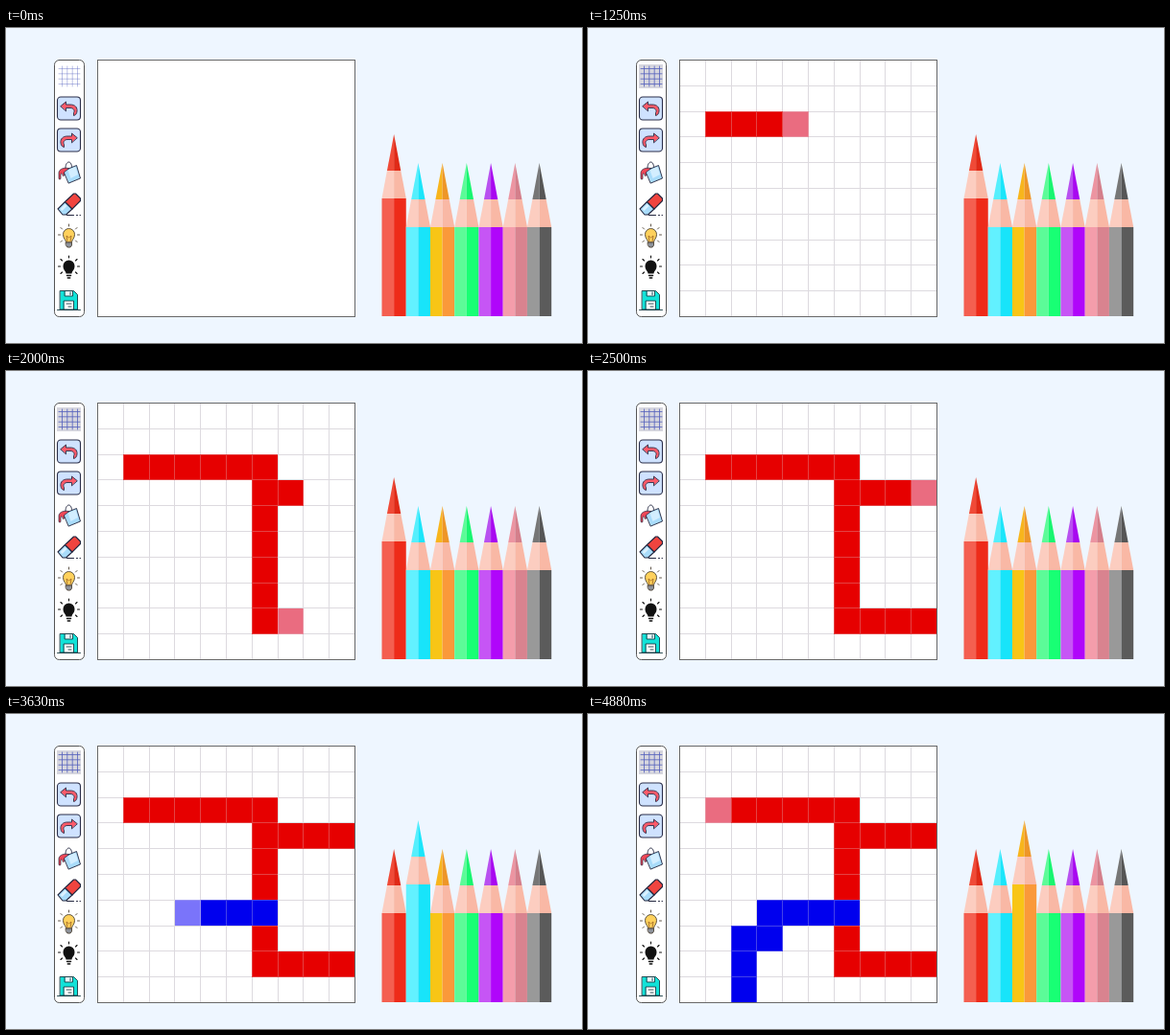
Recreate the animation shown at these times as an HTML page. Size 600x329 px, loop 5010 ms.

```html
<!DOCTYPE html>
<html lang="en">
<head>
<meta charset="utf-8">
<title>Pixel drawing board</title>
<style>
html, body { margin: 0; width: 100%; height: 100%; overflow: hidden; background: #eef6ff; }
svg { display: block; width: 100vw; height: 100vh; }
</style>
</head>
<body>
<svg viewBox="0 0 600 329" stroke-linejoin="round" stroke-linecap="round">
  <defs>
    <g id="undo" stroke="#2b2f4a">
      <rect x="1" y="1" width="24" height="24" rx="3.500" fill="#cfe2ff" stroke-width="1.100"/>
      <path d="M4.500 10.500 10 6V9H14.500C19.500 9 22 12 21.500 16 21.200 18.500 20 20 18 20.500V17.500C19.500 15.500 18 12.500 14.500 12.500H10V15.500Z" fill="#ff5a69" stroke-width=".9"/>
    </g>
    <path id="rays" d="M13 1V3M4.500 4.500 6 6M21.500 4.500 20 6M2 12H4M22 12H24M4.500 19.500 6 18M21.500 19.500 20 18"/>
    <path id="glass" d="M10 19.500C10 17 7 16 7 11.500A6 6 0 0 1 19 11.500C19 16 16 17 16 19.500Z"/>
  </defs>

  <rect x="50.5" y="33.5" width="31" height="268" rx="5" fill="#fff" stroke="#555"/>

  <rect id="hover" x="53" y="38" width="25" height="25" fill="#d6d6de"/>
  <path id="gridIcon" d="M58.500 40V61M63.800 40V61M69.200 40V61M74.500 40V61M55 42.500H77M55 47.800H77M55 53.200H77M55 58.500H77" fill="none" stroke="#5360bd" stroke-width=".8"/>

  <use href="#undo" x="52.500" y="71"/>
  <use href="#undo" transform="translate(78.500 104) scale(-1 1)"/>

  <g transform="translate(52.5 138)" stroke="#22263f" stroke-width=".9">
    <path d="M9.500 10C9 5 11 2 13 2 15 2 16 5 16.500 9" fill="none"/>
    <path d="M7.500 11 21 5.500 25 19 13 24Z" fill="#a9dcfb"/>
    <path d="M12 10.500 20 7 22.500 15 15 19Z" fill="#d3eeff" stroke="none"/>
    <path d="M13 8.500C8 7.500 3 9 2.500 13V19C2.500 20.500 4.500 20.500 4.500 19V14.500C5.500 13.500 6.500 14 6.500 15.500 6.500 17 8 17 8 15.500V13Z" fill="#ef4656" stroke-width=".7"/>
  </g>

  <g transform="translate(52.5 171)" stroke="#22263f" stroke-width="1.100">
    <path d="M1.500 18 9 10.500 16.500 18 10 24H6.500Z" fill="#a9dcfb"/>
    <path d="M9 10.500 18 2H20L25 7V9.500L16.500 18Z" fill="#f0443f"/>
    <path d="M4 18 9 13 11 15 6 20Z" fill="#dcf2ff" stroke="none"/>
    <path d="M11 24.500H18M21 24.500H22M24.500 24.500H25" fill="none"/>
  </g>

  <g transform="translate(52.5 204)" stroke="#4c4234" stroke-width=".9" fill="none">
    <use href="#rays"/>
    <use href="#glass" fill="#ffd15c"/>
    <path d="M11.500 19 10.500 13 13 15 15.500 13 14.500 19" stroke="#a56e26"/>
    <path d="M10 20H16V23L14.500 25H11.500L10 23Z" fill="#8d929b"/>
  </g>

  <g transform="translate(52.5 237)" stroke="#111" stroke-width="1.100">
    <use href="#rays"/>
    <use href="#glass" fill="#111" stroke="none"/>
    <path d="M11 21.500H15M11.800 24H14.200" stroke-width="1.500"/>
  </g>

  <g transform="translate(52.5 271)" stroke="#173c45" stroke-width=".9">
    <path d="M4 3.500H18L22 7.500V23H4Z" fill="#12e2d8"/>
    <path d="M9 3.500H17V9H9Z" fill="#e8fbff"/>
    <path d="M8 14H18V23H8Z" fill="#fff"/>
    <path d="M14.500 5V7.500M10.500 17H15.500M12.500 20H15.500M1 23.500H25" fill="none"/>
  </g>

  <rect x="95.500" y="33.500" width="268.500" height="268" fill="#fff"/>
  <path id="lines" fill="none" stroke="#dcd9df" shape-rendering="crispEdges"/>
  <g id="cells" shape-rendering="crispEdges"></g>
  <use href="#lines" opacity=".3"/>
  <rect x="95.500" y="33.500" width="268" height="268" fill="none" stroke="#686868" stroke-linejoin="miter"/>
  <g id="pencils"></g>
</svg>
<script>
const LOOP = 5010, SIZE = 26.8, LEFT = 95.5, TOP = 33.5;
const RED = ['#e60000', '#ea6c80'], BLUE = ['#0000ee', '#7a74fa'];
const $ = id => document.getElementById(id);

function add(parent, tag, attrs) {
  const el = document.createElementNS('http://www.w3.org/2000/svg', tag);
  for (const k in attrs) el.setAttribute(k, attrs[k]);
  return parent.appendChild(el);
}

// Painted cells in order: column, row, time of the click
const red = [
  [1, 2, 1080], [2, 2, 1130], [3, 2, 1245], [4, 2, 1380], [5, 2, 1440], [6, 2, 1500],
  [6, 3, 1570], [7, 3, 1630], [6, 4, 1690], [6, 5, 1750], [6, 6, 1810], [6, 7, 1880],
  [6, 8, 1960], [7, 8, 2125], [8, 8, 2250], [9, 8, 2380], [8, 3, 2500], [9, 3, 2630]
];
const blue = [
  [6, 6, 3380], [5, 6, 3500], [4, 6, 3620], [3, 6, 3750], [3, 7, 3810],
  [2, 7, 3880], [2, 8, 3940], [2, 9, 4000]
];
const strokes = [
  ...red.map(s => [...s, RED]), ...blue.map(s => [...s, BLUE]), [1, 2, LOOP, RED]
].map(([col, row, at, tone], i, all) => ({
  at, tone,
  from: Math.max(at - 140, i ? all[i - 1][2] : 0),
  el: add($('cells'), 'rect', {
    x: LEFT + col * SIZE, y: TOP + row * SIZE, width: SIZE, height: SIZE
  })
}));

let d = '';
for (let i = 1; i < 10; i++) {
  const x = Math.floor(LEFT + i * SIZE) + .5, y = Math.floor(TOP + i * SIZE) + .5;
  d += `M${x} 34V301M96 ${y}H363`;
}
$('lines').setAttribute('d', d);

// Body left, body right, lead left, lead right
const pencils = [
  ['#f45f50', '#ee2b19', '#f04a37', '#e02a17'],
  ['#62f1ff', '#18e4fa', '#55effd', '#1be5fa'],
  ['#f8c516', '#fa993a', '#f8b51c', '#ee9628'],
  ['#5cfb98', '#18ff74', '#5cfb98', '#18f570'],
  ['#c655f5', '#b006fa', '#b850f0', '#a808f0'],
  ['#f49dab', '#d9838f', '#ec94a1', '#d47f8b'],
  ['#999999', '#5b5b5b', '#767676', '#565656']
].map((tones, i) => {
  const w = 12.62, x = 391.5 + i * 2 * w + w;
  const g = add($('pencils'), 'g', {});
  const halves = [-1, 1].map((side, k) => {
    const edge = x + side * w, mid = x + side * 7.15;
    const body = add(g, 'path', { fill: tones[k] });
    const wood = add(g, 'path', { d: `M${x} 179H${mid}L${edge} 208H${x}Z`, fill: k ? '#f9b8a5' : '#fccdc0' });
    const lead = add(g, 'path', { d: `M${x} 141L${mid} 179H${x}Z`, fill: tones[k + 2] });
    return { body, tip: [wood, lead], edge };
  });
  return up => halves.forEach(({ body, tip, edge }) => {
    body.setAttribute('d', `M${x} ${208 - up}H${edge}V301H${x}Z`);
    tip.forEach(p => p.setAttribute('transform', `translate(0 ${-up})`));
  });
});

// Start time, then the raised pencils: the chosen one and any under the pointer
const picks = [[0, 0], [2880, 0, 2], [3130, 1], [4500, 1, 2], [4630, 2]];

function draw(t) {
  const lit = Math.min(1, Math.max(0, (t - 100) / 300));
  $('hover').setAttribute('opacity', lit);
  $('gridIcon').setAttribute('opacity', .5 + .5 * lit);
  $('lines').setAttribute('visibility', t >= 250 ? 'visible' : 'hidden');
  for (const s of strokes) {
    s.el.setAttribute('fill', t >= s.at ? s.tone[0] : t >= s.from ? s.tone[1] : 'none');
  }
  const raised = picks.filter(p => t >= p[0]).pop().slice(1);
  pencils.forEach((lift, i) => lift(raised.includes(i) ? 30 : 0));
}

const start = performance.now();
function tick() {
  draw((performance.now() - start) % LOOP);
  requestAnimationFrame(tick);
}
tick();
</script>
</body>
</html>
```
